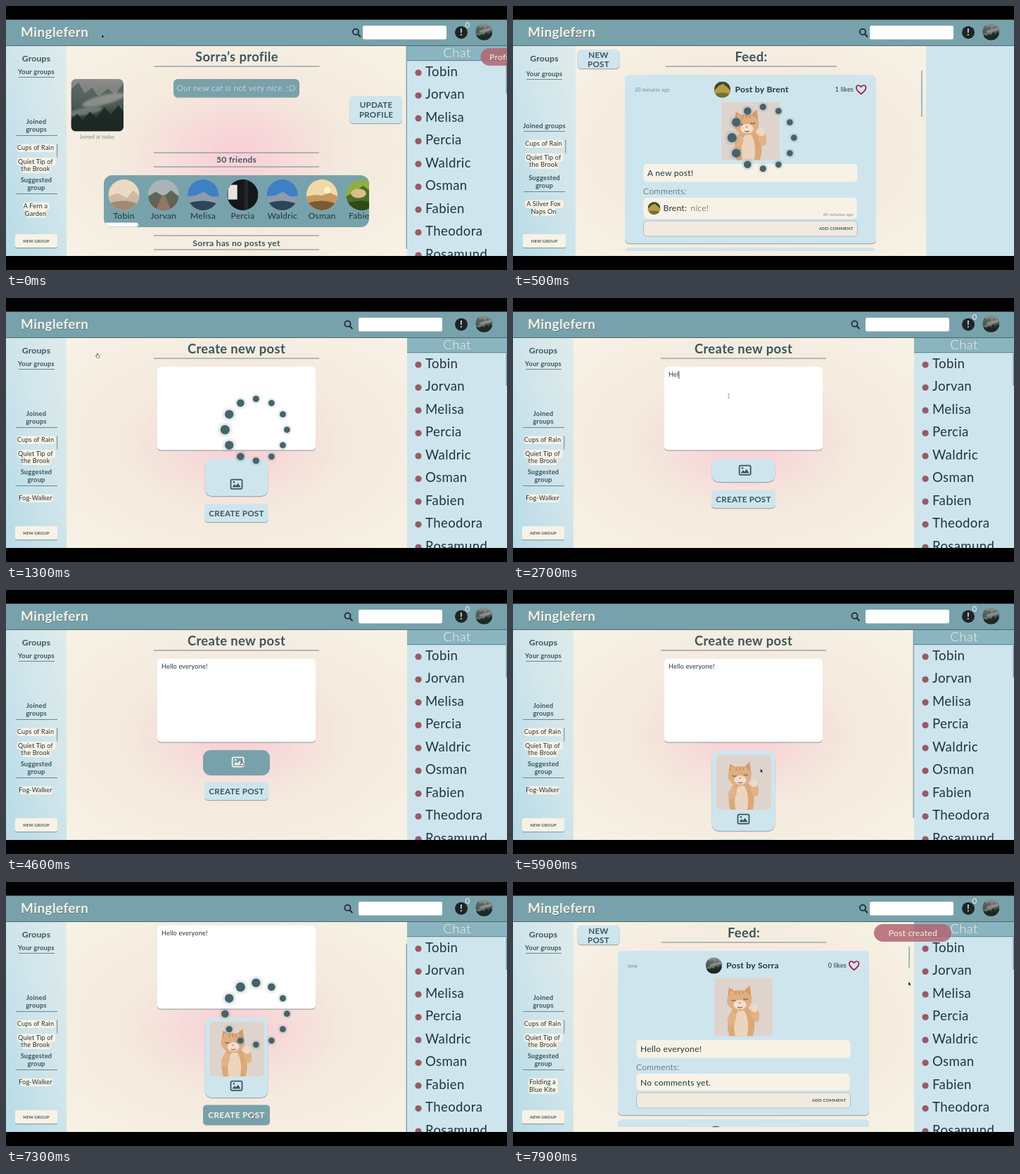
Animation, 712 px wide and 376 px high, one loop 8 s. Source, as an HTML page:

```html
<!DOCTYPE html>
<html lang="en">
<head>
<meta charset="utf-8">
<title>Social page</title>
<style>
html, body { margin: 0; width: 100%; height: 100%; overflow: hidden; background: #000; }
svg { display: block; width: 100vw; height: 100vh; }
text { font-family: Lato, "Open Sans", sans-serif; text-anchor: middle; fill: #22343a; letter-spacing: .02em; }
.b { font-weight: 700; }
.l { font-weight: 300; }
.s { text-anchor: start; }
.e { text-anchor: end; }
.t { fill: #3b565d; }
.c { fill: #f8f2e6; }
.g { fill: #77888d; }
</style>
</head>
<body>
<svg id="stage" viewBox="0 0 712 376">
  <defs>
    <radialGradient id="glow" r=".707">
      <stop offset="0" stop-color="#f8cfd4"/>
      <stop offset=".15" stop-color="#f7d6d8"/>
      <stop offset=".34" stop-color="#f5e3dc"/>
      <stop offset=".48" stop-color="#f4eade"/>
      <stop offset=".75" stop-color="#f5eee1"/>
      <stop offset="1" stop-color="#f8f2e6"/>
    </radialGradient>
    <linearGradient id="side" x1="1" y1="0" x2="0" y2="1">
      <stop offset="0" stop-color="#e0ebea"/>
      <stop offset=".45" stop-color="#d0e5eb"/>
      <stop offset="1" stop-color="#b7dbe6"/>
    </linearGradient>
    <linearGradient id="fog" x2="0" y2="1">
      <stop offset="0" stop-color="#8d8c8a"/>
      <stop offset=".3" stop-color="#77807c"/>
      <stop offset=".6" stop-color="#3d4a44"/>
      <stop offset="1" stop-color="#18211f"/>
    </linearGradient>
    <clipPath id="strip"><rect x="139" y="241" width="377" height="74" rx="12"/></clipPath>
    <clipPath id="round"><circle r="1"/></clipPath>
    <clipPath id="feedClip"><rect x="86" y="57" width="500" height="292"/></clipPath>
    <clipPath id="square"><rect width="100" height="100" rx="1"/></clipPath>
    <clipPath id="soft"><rect width="100" height="100" rx="9"/></clipPath>
    <filter id="blur"><feGaussianBlur stdDeviation="2.2"/></filter>
  </defs>
</svg>
<script>
const TEAL = '#78a2ab', BLUE = '#cfe5ee', CREAM = '#f8f2e6', INK = '#3b565d';
const stage = document.getElementById('stage');
const $ = id => document.getElementById(id);

const T = (x, y, s, size, cls = '') =>
  `<text x="${x}" y="${y}" font-size="${size}" class="${cls}">${s}</text>`;
const R = (x, y, w, h, fill, r = 0, more = '') =>
  `<rect x="${x}" y="${y}" width="${w}" height="${h}" rx="${r}" fill="${fill}" ${more}/>`;
const C = (x, y, r, fill, more = '') => `<circle cx="${x}" cy="${y}" r="${r}" fill="${fill}" ${more}/>`;
const E = (x, y, rx, ry, fill, more = '') =>
  `<ellipse cx="${x}" cy="${y}" rx="${rx}" ry="${ry}" fill="${fill}" ${more}/>`;
const P = (d, fill, more = '') => `<path d="${d}" fill="${fill}" ${more}/>`;
const G = (body, more = '') => `<g ${more}>${body}</g>`;
const line = (x1, x2, y) => R(x1, y - .5, x2 - x1, 1, '#6d868c');
const box = (x, y, w, h, fill, r) =>
  R(x, y + 1.2, w, h, '#4d6d76', r, 'opacity=".5"') + R(x, y, w, h, fill, r);

// Photos, as flat shapes
const fogArt = R(0, 0, 100, 100, 'url(#fog)') +
  P('M0 20L14 6L26 28L40 16L52 34L70 18L84 30L100 8V50H0Z', '#4b5853', 'opacity=".7"') +
  E(62, 40, 42, 9, '#b3b1ad', 'opacity=".6" filter="url(#blur)" transform="rotate(-14 62 40)"') +
  E(25, 62, 34, 7, '#a3a9a5', 'opacity=".5" filter="url(#blur)" transform="rotate(-10 25 62)"') +
  P('M0 78L12 66L22 80L36 62L48 74L64 54L76 68L90 50L100 62V100H0Z', '#1d2825', 'opacity=".9"');
const catArt = R(0, 0, 100, 100, '#dfd4cd') +
  E(46, 82, 23, 36, '#dba878') +
  E(46, 84, 12, 30, '#ecd5be') +
  P('M22 42L25 17L43 27Z', '#d49c6c') + P('M64 38L61 13L47 26Z', '#d49c6c') +
  P('M27 33L28 22L37 28Z', '#ecc0a8') +
  E(43, 39, 21, 18, '#dfae82') +
  E(44, 46, 11, 8, '#f1e0cf') +
  P('M29 38q4 3 8 0M50 36q4 3 8 0M40 50q4 3 8 0', 'none', 'stroke="#94633f" stroke-width="1.6"') +
  P('M41 42h5l-2.5 3Z', '#cd8779') +
  P('M37 23v6M43 22v7M49 22v6', 'none', 'stroke="#c58d5c" stroke-width="1.8"') +
  E(70, 62, 7, 14, '#e2b389', 'transform="rotate(-10 70 62)"') +
  E(69, 52, 6, 7, '#f0dac6') +
  E(30, 70, 7, 12, '#e2b389', 'transform="rotate(20 30 70)"');
const photo = (art, x, y, w, clip = 'square') =>
  G(G(art, `clip-path="url(#${clip})"`), `transform="translate(${x} ${y}) scale(${w / 100})"`);
const disc = (x, y, r, body) =>
  G(G(body, 'clip-path="url(#round)"'), `transform="translate(${x} ${y}) scale(${r})"`);
const fogDisc = (x, y, r) => disc(x, y, r, G(fogArt, 'transform="translate(-1 -1) scale(.02)"'));
// Sky, far shape, near ground
const view = (sky, far, near, ridge) =>
  R(-1, -1, 2, 2, sky) + P(`M-1 1V.1L${ridge}L1 .1V1Z`, far) + P('M-1 1V.55Q0 .2 1 .6V1Z', near);
const meadow = view('#3d4a2b', '#b79a45', '#75703a', '-.4 -.5L.1 -.7L.6 -.3');

const friends = ['Tobin', 'Jorvan', 'Melisa', 'Percia', 'Waldric', 'Osman', 'Fabien', 'Theodora', 'Rosamund'];
const peak = view('#3f7fc4', '#8d9ca9', '#2d4557', '-.5 .05L.05 -.2L.5 .1');
const views = [
  view('#ecd9c2', '#cdb9a6', '#a08a76', '-.4 -.1L.2 .2L.6 -.3'),
  view('#a9b3b8', '#5d6658', '#6f5c4c', '-.5 -.2L0 .1L.5 -.3') + P('M-.5 1L-.08 0H.08L.5 1Z', '#8d7866'),
  peak,
  R(-1, -1, 2, 2, '#15171a') + R(-.95, -.65, .6, .95, '#e6e4df') + R(.1, -1, .25, 2, '#24272a'),
  peak,
  view('#f0d9a8', '#c69a5c', '#7b5a38', '-.5 0L0 .05L.5 -.15') + C(.35, -.3, .22, '#fff1c9'),
  view('#8fae45', '#4c6d26', '#2e4a1a', '-.3 -.3L.1 -.6L.5 -.3') + E(-.2, -.1, .5, .3, '#d9c08a')
];

const chat = () => R(570, 57, 142, 299, BLUE) +
  friends.map((n, i) => C(586, 95 + 32.5 * i, 4.6, '#965b67') + T(596, 99.7 + 32.5 * i, n, 18.6, 's')).join('') +
  R(570, 57, 142, 20.5, '#8ab4bf') + R(570, 77, 142, 1.2, '#5f8a95') +
  T(641, 73, 'Chat', 18.5, 'l c') + R(710.5, 79, 1.5, 46, TEAL);

// The wide form stands while the chat is still empty
function sidebar(tip, wide) {
  const w = wide ? 89 : 86, x = w / 2, o = wide ? 1 : 0;
  const d = wide ? -3 : 0, j = wide ? -6 : 0;
  const tag = (y, s) => {
    const half = s.length * 2.15 + 1.5;
    return R(x - half, y - 8.6, half * 2, 11.5, CREAM, 4) + T(x - 1, y, s, 9.1);
  };
  return R(0, 57, w, 299, 'url(#side)') +
    T(x, 79, 'Groups', 12.2, 'b t') +
    T(x, 96.5 - d, 'Your groups', 9.4, 'b t') + line(18 + o, 69 + o, 101.5 - d) +
    (wide ? T(x, 173.5, 'Joined groups', 9.4, 'b t')
          : T(x, 168, 'Joined', 9.4, 'b t') + T(x, 179, 'groups', 9.4, 'b t')) +
    line(14 + o, 73 + o, 184.5 + j) +
    tag(205 + j, 'Cups of Rain') + tag(224.5 + j, 'Quiet Tip of') + tag(235 + j, 'the Brook') +
    R(72 + o * 2, 196.5 + j, 1.3, 19, TEAL) +
    T(x, 251 + d, 'Suggested', 9.4, 'b t') + T(x, 262 + d, 'group', 9.4, 'b t') +
    line(14 + o, 73 + o, 267.5 + d) +
    tip.map((s, i) => tag(288 + d + 10.7 * i, s)).join('') +
    box(13 + o, 325, 60 + o, 19, CREAM, 2) + T(x, 337, 'NEW GROUP', 5.9, 'b t');
}

const backdrop = (x, w) => R(x, 57, w, 299, 'url(#glow)');
const title = (x, s, half = 117.5) => T(x, 79, s, 18.4, 'b t') + line(x - half, x + half, 86);
const heart = (x, y) => P(`M${x} ${y + 6.5}C${x - 12} ${y - 2} ${x - 5.5} ${y - 9.5} ${x} ${y - 3.6}C${x + 5.5} ${y - 9.5} ${x + 12} ${y - 2} ${x} ${y + 6.5}Z`,
  'none', 'stroke="#a5143f" stroke-width="1.7"');

const profile = backdrop(86, 484) + title(328, 'Sorra’s profile') +
  photo(fogArt, 92.5, 104, 74.5, 'soft') + T(129.5, 189, 'Joined at today', 7.1, 'g') +
  box(238, 104, 179, 25.5, TEAL, 6) + T(327, 121, 'Our new car is not very nice. :D', 11.9, 'l c') +
  box(488.5, 128, 74.5, 39, BLUE, 5) + T(526, 145, 'UPDATE', 11.6, 'b t') + T(526, 158.5, 'PROFILE', 11.6, 'b t') +
  line(210, 445, 209) + T(327.5, 223, '50 friends', 12.2, 'b t') + line(210, 445, 229) +
  G(R(139, 241, 377, 74, TEAL) +
    views.map((v, i) => disc(167.5 + 56.3 * i, 269, 22, v) + T(167.5 + 56.3 * i, 303, friends[i], 12.2)).join('') +
    R(139.5, 308, 49, 7, '#fdfcf8', 3.5, 'stroke="#557a83" stroke-width=".6"'), 'clip-path="url(#strip)"') +
  line(210, 445, 327) + T(327.5, 341.5, 'Sorra has no posts yet', 12.2, 'b t') + line(210, 445, 347) +
  R(568.6, 57, 1.4, 289, TEAL) + chat() + sidebar(['A Fern a', 'Garden']);

function card(x, own) {
  const h = own ? 24 : 30, add = 273 + h + 3, end = add + 32;
  const face = (cx, cy, r) => own ? fogDisc(cx, cy, r) : disc(cx, cy, r, meadow);
  return box(x, 98, 357, end - 98, BLUE, 6) +
    T(x + 14, 121.5, own ? 'now' : '20 minutes ago', 7.1, 's g') +
    face(x + (own ? 136.5 : 138.5), 119, 11.5) +
    T(x + (own ? 154 : 156.5), 123.3, 'Post by ' + (own ? 'Sorra' : 'Brent'), 12.2, 's b') +
    T(x + 325, 122, (own ? 0 : 1) + ' likes', 9.1, 'e') + heart(x + 335.7, 118.7) +
    photo(catArt, x + 137, 136.5, 83) +
    R(x + 26.5, 225, 304, 25.5, CREAM, 5) + T(x + 32, 242, own ? 'Hello everyone!' : 'A new post!', 12.1, 's') +
    T(x + 26, 268, 'Comments:', 12.1, 's l') +
    R(x + 26.5, 273, 303, h, CREAM, 5) +
    (own ? T(x + 32, 289.5, 'No comments yet.', 12.1, 's')
         : face(x + 41.5, 288, 9) +
           T(x + 54.5, 292, 'Brent: <tspan font-weight="300" dx="2">nice!</tspan>', 12.1, 's') +
           T(x + 325, 298.5, '20 minutes ago', 6.2, 'e g')) +
    R(x + 26.5, add, 304, 22, '#f2eade', 5, 'stroke="#9db4ba" stroke-width=".8"') +
    T(x + 324.5, add + 13.2, 'ADD COMMENT', 6.1, 'e b t') +
    R(x, end + 6, 357, 40, BLUE, 6) + disc(x + 139, end + 27, 11.5, meadow);
}
const newPost = box(91.5, 62, 60, 27, BLUE, 5) + T(121.5, 73.5, 'NEW', 11.6, 'b t') + T(121.5, 86.5, 'POST', 11.6, 'b t');
const feed = (own, tip) => backdrop(86, 484) + title(328, 'Feed:') + newPost +
  G(card(149, own), 'clip-path="url(#feedClip)"') + R(562.4, 92, 1.4, 30, TEAL) +
  chat() + sidebar(tip);
const feedWide = backdrop(89, 498) + title(338.5, 'Feed:', 121.5) + newPost +
  G(card(159, false), 'clip-path="url(#feedClip)"') + R(580.2, 92, 1.4, 66, TEAL) +
  R(587, 57, 125, 299, BLUE) + sidebar(['A Silver Fox', 'Naps On'], true);

const icon = fill => R(-8, -6.6, 16, 13.2, 'none', 1.8, `stroke="${fill}" stroke-width="1.8"`) +
  P('M-6 4.2L-2.8 -.2L-.6 2.2L2.2 -1.8L6 4.2Z', fill) + C(-3.6, -3, 1.3, fill);
const create = backdrop(86, 484) +
  G(title(327.5, 'Create new post') + box(215, 98, 225, 118.5, '#fff', 5) +
    '<text id="typed" class="s" x="221" y="112" font-size="9.1" xml:space="preserve"></text>' +
    R(235, 104, .8, 11, '#222', 0, 'id="caret"') +
    R(282.5, 230.2, 90, 33, '#4d6d76', 10, 'id="pickShade" opacity=".5"') +
    R(282.5, 229, 90, 33, BLUE, 10, 'id="pick"') +
    G(photo(catArt, 288.5, 234.5, 78.5, 'soft'), 'id="thumb"') +
    G(icon(INK), 'id="pickIcon"') +
    G(box(280, 228, 95, 35, TEAL, 11) + G(icon(CREAM), 'transform="translate(329.7 245)"'), 'id="pickHot"') +
    G(box(282, 0, 91, 25.5, BLUE, 5) + T(327.5, 17, 'CREATE POST', 11.7, 'b t') +
      G(box(280, -1, 95, 28, TEAL, 5) + T(327.5, 17, 'CREATE POST', 12, 'b c'), 'id="sendHot"'), 'id="send"'),
    'id="scroll"') +
  R(568.6, 57, 1.4, 268, TEAL, 0, 'id="bar"') + chat() + sidebar(['Fog-Walker']);

const scenes = { profile, feedWide, feedOld: feed(false, ['A Silver Fox', 'Naps On']), create, feedNew: feed(true, ['Folding a', 'Blue Kite']) };

const header = R(0, 56, 712, 1, '#6a929b', 0, 'opacity=".7"') + R(0, 19, 712, 37, TEAL) +
  T(21.5, 45, 'Minglefern', 19, 's b" fill-opacity=".35') + T(21, 44, 'Minglefern', 19, 's b c') +
  G(C(497, 36.8, 4.1, 'none', 'stroke="#1d2a2e" stroke-width="1.8"') +
    P('M500 40L504 44', 'none', 'stroke="#1d2a2e" stroke-width="2"'), 'id="lens"') +
  R(507, 28, 119, 19.5, '#fff', 2.5, 'id="field"') +
  C(647, 37.7, 9, '#1d2529') + T(647, 42.3, '!', 13, 'b c') +
  G(T(656, 31.3, '0', 11.5, 'c'), 'id="count"') + fogDisc(679.3, 36.8, 12);

const dots = Array.from({ length: 12 }, (_, k) => {
  const a = k * Math.PI / 6;
  return G(C(0, 0, 5.5, '#4f6f77', 'opacity=".35" filter="url(#blur)"') + C(0, 0, 4.4, '#46636a'),
    `class="dot" data-x="${355.3 + 44 * Math.cos(a)}" data-y="${187.7 - 44 * Math.sin(a)}"`);
}).join('');

const pointers = G(P('M0 0V5.5L1.4 4.4L2.4 6.4L3.3 6L2.4 4H4Z', '#111', 'stroke="#fff" stroke-width=".35"'), 'id="arrow"') +
  G(P('M-.8 -3V1L-2.2 0L-2.6 .8L-.6 3.4H2.2L2.8 0L.4 -.6V-3Q-.2 -3.6 -.8 -3Z', '#fff', 'stroke="#333" stroke-width=".6"'), 'id="hand"') +
  G(P('M-1.3 -3H1.3M0 -3V3M-1.3 3H1.3', 'none', 'stroke="#777" stroke-width=".6"'), 'id="beam"');

stage.insertAdjacentHTML('beforeend',
  Object.keys(scenes).map(n => G(scenes[n], `id="${n}"`)).join('') + header +
  G(R(0, 60, 110, 25, '#b26673', 12.5, 'id="pill" opacity=".85"') +
    '<text id="note" y="77" font-size="12.2" class="c"></text>', 'id="toast"') +
  G(dots, 'id="spinner"') + G(pointers, 'id="pointer"') +
  R(0, 0, 712, 19.5, '#000') + R(0, 356, 712, 20, '#000'));
const dotNodes = [...document.querySelectorAll('.dot')];

const show = (id, on) => $(id).setAttribute('display', on ? 'inline' : 'none');
const set = (id, o) => { for (const k in o) $(id).setAttribute(k, o[k]); };
const ramp = (t, a, b) => Math.min(1, Math.max(0, (t - a) / (b - a)));
const smooth = u => u * u * (3 - 2 * u);
// Last value whose start time has passed
const at = (steps, t) => steps.reduce((v, [from, to]) => t >= from ? to : v, steps[0][1]);

const plan = [[0, 'profile'], [400, 'feedWide'], [800, 'feedOld'], [1200, 'create'], [7400, 'feedNew']];
const loads = [[400, 800, 500], [1200, 1600, 1300], [7100, 7400, 7100]];
const keys = [[0, 0], [2400, 1], [2600, 2], [2700, 3], [2800, 4], [2900, 5], [3000, 6], [3200, 7],
  [3400, 9], [3500, 10], [3600, 12], [3700, 14], [3800, 15]];
const path = [[0, 136, 40], [300, 90, 41], [700, 90, 41], [1000, 130, 82], [1800, 130, 82], [2100, 306.5, 139.5],
  [4100, 306.5, 139.5], [4400, 335, 247], [5800, 335, 247], [6200, 441, 295], [6500, 441, 295],
  [6700, 350, 333], [7300, 350, 333], [7800, 562, 142], [8000, 562, 142]];
const shapes = [[0, 'arrow'], [200, 'hand'], [800, 'arrow'], [1000, 'hand'], [1900, 'arrow'], [2100, 'beam'],
  [4200, 'arrow'], [4300, 'hand'], [4800, ''], [5800, 'arrow'], [6700, 'hand'], [7400, 'arrow']];

function pulse(p) {
  p -= Math.floor(p);
  return 1 + .5 * smooth(1 - Math.min(1, Math.abs(p - .5) / .3));
}

function drawCreate(t) {
  const text = 'Hello everyone!'.slice(0, at(keys, t));
  $('typed').textContent = text;
  show('caret', t >= 2300 && t < 4100);
  set('caret', { x: 221.2 + (text ? $('typed').getComputedTextLength() : 0) });
  const h = at([[0, 53], [1600, 33], [5800, 114]], t);
  set('pick', { height: h });
  set('pickShade', { height: h });
  show('thumb', h > 100);
  set('pickIcon', { transform: `translate(${h === 33 ? 329.7 : 327.5} ${229 + h - 16.8})` });
  set('pickHot', { opacity: h === 33 ? ramp(t, 4200, 4400) - ramp(t, 4700, 5100) : 0 });
  set('send', { transform: `translate(0 ${240.5 + h})` });
  set('sendHot', { opacity: ramp(t, 6600, 6800) });
  const y = 36 * smooth(ramp(t, 6100, 6500));
  set('scroll', { transform: `translate(0 ${-y})` });
  show('bar', h > 100);
  set('bar', { y: 57 + y * 31 / 36 });
}

function draw(t) {
  const scene = at(plan, t);
  for (const n in scenes) show(n, n === scene);
  const making = scene === 'create';
  if (making) drawCreate(t);

  set('lens', { transform: `translate(${making ? -11.5 : 0} 0)` });
  set('field', { x: making ? 501 : 507 });
  show('count', !(t >= 400 && t < 800) && !(t >= 1200 && t < 1700));

  const load = loads.find(([a, b]) => t >= a && t < b);
  show('spinner', load);
  if (load) dotNodes.forEach((d, k) => d.setAttribute('transform',
    `translate(${d.dataset.x} ${d.dataset.y}) scale(${pulse((t - load[2]) / 1200 + k / 12)})`));

  const late = t > 4000;
  const x = late ? 513 + 199 * Math.pow(1 - ramp(t, 7500, 7900), 1.7) : 674.5 + t * .3;
  show('toast', late ? t >= 7600 : t < 200);
  set('toast', { transform: `translate(${x} 0)` });
  set('note', { x: 55.3 });
  $('note').textContent = late ? 'Post created' : 'Profile updated';

  const i = path.findIndex((p, n) => n && t < p[0]);
  const [a, b] = [path[i - 1], path[i]], u = smooth(ramp(t, a[0], b[0]));
  set('pointer', { transform: `translate(${a[1] + (b[1] - a[1]) * u} ${a[2] + (b[2] - a[2]) * u})` });
  const shape = at(shapes, t);
  for (const s of ['arrow', 'hand', 'beam']) show(s, s === shape);
}

// The picture advances ten times a second
const start = performance.now();
function tick() {
  const t = Math.max(0, performance.now() - start) % 8000;
  draw(Math.floor(t / 100) * 100);
  requestAnimationFrame(tick);
}
draw(0);
tick();
</script>
</body>
</html>
```
